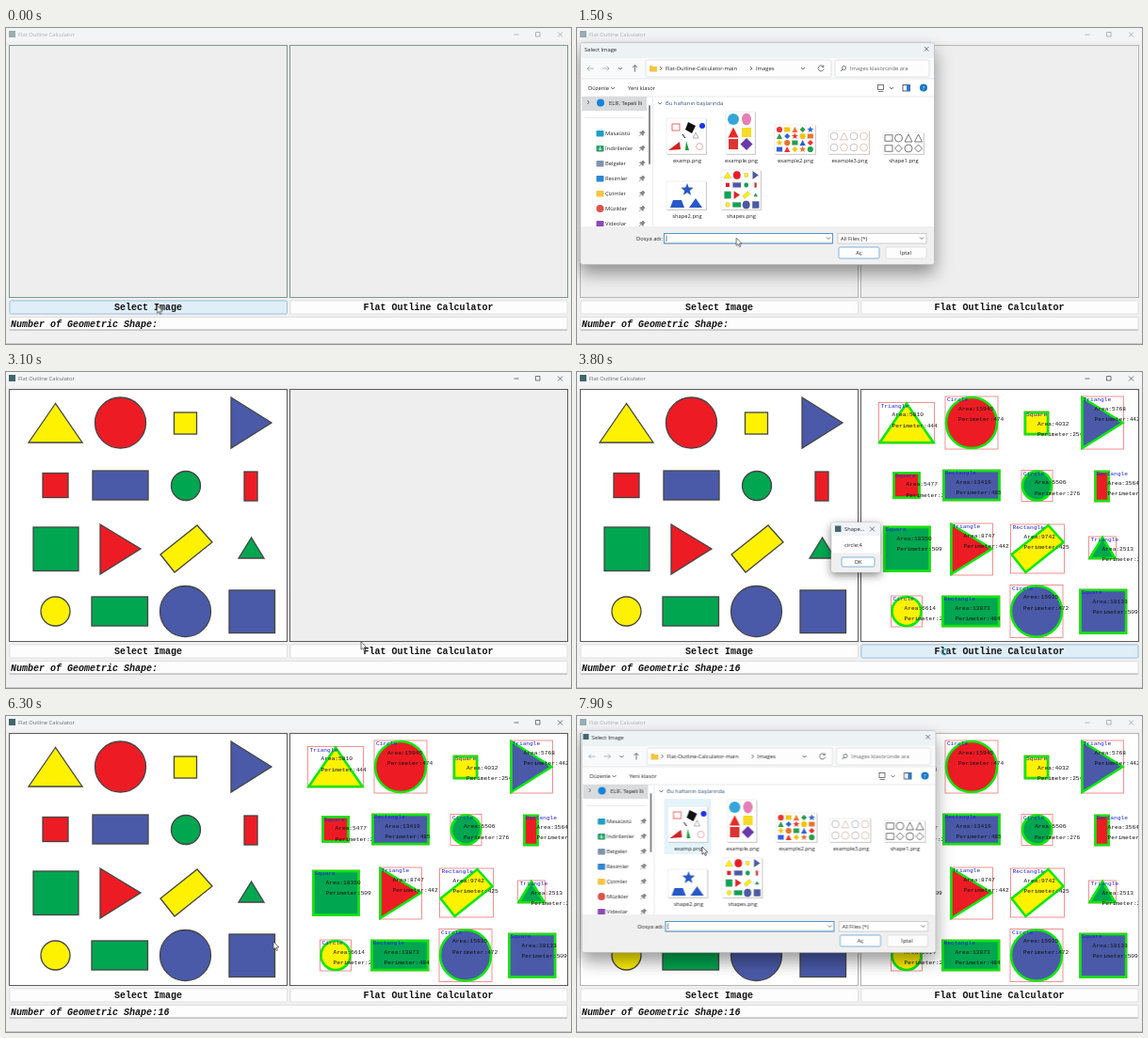
Recreate the animation shown at these times as an HTML page. Size 600 by 336 pixels, loop 8 s.

```html
<!DOCTYPE html>
<html lang="en">
<head>
<meta charset="utf-8">
<title>Shape counter</title>
<style>
html, body { margin: 0; width: 100%; height: 100%; overflow: hidden; background: #f0f0f0; }
svg { display: block; width: 100%; height: 100%; }
text { font: 5.8px "Open Sans", "Noto Sans", sans-serif; fill: #222; white-space: pre; }
.mono { font: bold 10px "Liberation Mono", monospace; fill: #111; }
.it { font-style: italic; }
.note { font: 6.2px "Liberation Mono", monospace; fill: #111; }
.name { fill: #2222d8; }
.mid { text-anchor: middle; }
.dim { fill: #666; }
.line { fill: none; stroke: #555; stroke-width: .8; }
.panel { fill: #eee; animation: border 8s infinite; }
.btn { fill: #fdfdfd; stroke: #d6d6d6; stroke-width: .7; }
.hot { fill: #e0eef7; stroke: #7fb4d8; }
.down { fill: #cce4f7; stroke: #4f97cf; }
.main { stroke: #4f97cf; }
.float { filter: drop-shadow(0 3px 5px #0007); }
.high { filter: drop-shadow(0 9px 9px #0006); }
.step { animation: 8s step-end infinite; }
#caption { animation: caption 8s infinite; }
#hover { animation-name: hover; }
#press { animation-name: press; }
#count { animation-name: count; }
#left, #again { animation-name: left; }
#first { animation-name: first; }
#right, #total { animation-name: right; }
#dialog { animation-name: dialog; }
#picked, #file { animation-name: picked; }
#over { animation-name: over; }
#open { animation-name: open; }
#caret { animation-name: caret; }
#msg0 { animation-name: msg0; }
#msg1 { animation-name: msg1; }
#msg2 { animation-name: msg2; }
#msg3 { animation-name: msg3; }
#ok0 { animation-name: ok0; }
#arrow { animation-name: arrow; }
#busy { animation-name: busy; }
#cursor { animation: travel 8s ease-in-out infinite; }
@keyframes border {
  0% { stroke: #7d9a8c }
  5%, 12.4%, 33.75%, 87.4% { stroke: #5a5a5a }
  12.5%, 33.7%, 87.5%, 100% { stroke: #b4b4b4 }
}
@keyframes caption {
  0%, 12.5%, 33.7%, 87.5%, 100% { opacity: .5 }
  5%, 12.4%, 33.75%, 87.4% { opacity: 1 }
}
@keyframes hover { 0% { opacity: 1 } 7.5% { opacity: 0 } 83% { opacity: 1 } 87.5%, 100% { opacity: 0 } }
@keyframes press { 0% { opacity: 0 } 7.5% { opacity: 1 } 12.5% { opacity: 0 } 85.5% { opacity: 1 } 87.5%, 100% { opacity: 0 } }
@keyframes count { 0% { opacity: 0 } 39% { opacity: 1 } 49.5%, 100% { opacity: 0 } }
@keyframes left { 0% { opacity: 0 } 33.75%, 100% { opacity: 1 } }
@keyframes first { 0% { opacity: 1 } 33.75%, 100% { opacity: 0 } }
@keyframes right { 0% { opacity: 0 } 42.5%, 100% { opacity: 1 } }
@keyframes dialog {
  0% { opacity: 0; transform: none }
  12.5% { opacity: 1; transform: none }
  33.75% { opacity: 0; transform: none }
  87.5%, 100% { opacity: 1; transform: translateX(1.5px) }
}
@keyframes picked { 0% { opacity: 0 } 23.75% { opacity: 1 } 33.75%, 100% { opacity: 0 } }
@keyframes over { 0% { opacity: 0 } 94%, 100% { opacity: 1 } }
@keyframes open { 0% { opacity: 0 } 29% { opacity: 1 } 33.75%, 100% { opacity: 0 } }
@keyframes caret { 0% { opacity: 1 } 23.75% { opacity: 0 } 87.5%, 100% { opacity: 1 } }
@keyframes msg0 { 0% { opacity: 0 } 43.75% { opacity: 1 } 55%, 100% { opacity: 0 } }
@keyframes msg1 { 0% { opacity: 0 } 55% { opacity: 1 } 60%, 100% { opacity: 0 } }
@keyframes msg2 { 0% { opacity: 0 } 60% { opacity: 1 } 66.25%, 100% { opacity: 0 } }
@keyframes msg3 { 0% { opacity: 0 } 66.25% { opacity: 1 } 71.25%, 100% { opacity: 0 } }
@keyframes ok0 { 0% { opacity: 0 } 53%, 100% { opacity: 1 } }
@keyframes arrow { 0% { opacity: 1 } 42.5% { opacity: 0 } 49%, 100% { opacity: 1 } }
@keyframes busy { 0% { opacity: 0 } 42.5% { opacity: 1 } 49%, 100% { opacity: 0 } }
@keyframes travel {
  0%, 14% { transform: translate(160.5px, 295px) }
  22.5%, 24.5% { transform: translate(175px, 176px) }
  30%, 34.5% { transform: translate(282.5px, 234px) }
  40%, 49% { transform: translate(388px, 293px) }
  54%, 72% { transform: translate(303px, 205px) }
  77.5%, 79.5% { transform: translate(284px, 240px) }
  83.75%, 88.5% { transform: translate(160.5px, 295px) }
  95%, 100% { transform: translate(133px, 139px) }
}
</style>
</head>
<body>
<svg viewBox="0 0 600 336">
  <defs>
    <clipPath id="clipR"><rect x="302" y="19" width="294" height="267"/></clipPath>
    <clipPath id="clipSide"><rect x="4" y="73" width="70" height="138"/></clipPath>
  </defs>
  <rect width="600" height="336" fill="#f0f0f0"/>
  <rect width="600" height="14" fill="#f3f4f5"/>
  <path d="M0 335.5H600" stroke="#c9c9c9"/>
  <g id="caption">
    <rect x="3" y="3" width="7" height="7" fill="#41666c"/>
    <text x="13" y="9" class="dim">Flat Outline Calculator</text>
    <path class="line" d="M539.5 7h5M562.5 4.5h4.5v4.5h-4.5zM586 4.5l5 5m0-5l-5 5"/>
  </g>
  <rect class="panel" x="3.5" y="18.5" width="295" height="268"/>
  <rect class="panel" x="301.5" y="18.5" width="295" height="268"/>
  <g id="left" class="step">
    <rect x="4" y="19" width="294" height="267" fill="#fff"/>
    <g id="pic" stroke="#444" stroke-width="1.3"></g>
  </g>
  <g id="right" class="step">
    <g clip-path="url(#clipR)">
      <rect x="302" y="19" width="294" height="267" fill="#fff"/>
      <g id="found" transform="translate(297.5 0)"></g>
    </g>
  </g>
  <rect class="btn" x="4" y="290" width="294.5" height="14" rx="1.5"/>
  <rect id="hover" class="btn hot step" x="4" y="290" width="294.5" height="14" rx="1.5"/>
  <rect id="press" class="btn down step" x="4" y="290" width="294.5" height="14" rx="1.5"/>
  <rect class="btn" x="302" y="290" width="294" height="14" rx="1.5"/>
  <rect id="count" class="btn hot step" x="302" y="290" width="294" height="14" rx="1.5"/>
  <text class="mono" x="115" y="300">Select Image</text>
  <text class="mono" x="379.5" y="300">Flat Outline Calculator</text>
  <rect class="btn" x="3.5" y="307.5" width="592.5" height="13.5" rx="1"/>
  <path d="M4 321H596" stroke="#a0a0a0" stroke-width=".8"/>
  <text class="mono it" x="5" y="318">Number of Geometric Shape:</text>
  <text id="total" class="mono it step" x="161.5" y="318">16</text>
  <g id="dialog" class="step"></g>
  <g id="messages"></g>
  <g id="cursor">
    <path id="arrow" class="step" d="M0 0v8.2l1.9-1.7 1.3 3 1.3-.6-1.3-2.9h2.6z" fill="#fff" stroke="#333" stroke-width=".7"/>
    <circle id="busy" class="step" cx="2" cy="4.5" r="3" fill="none" stroke="#4aa3a8" stroke-width="1.3"/>
  </g>
</svg>
<script>
const $ = id => document.getElementById(id);
const Y = '#fff200', R = '#ed1c24', B = '#4a5aa8', G = '#00a650';

const rect = (x, y, w, h, attrs = '') => `<rect x="${x}" y="${y}" width="${w}" height="${h}" ${attrs}/>`;
const circle = (x, y, r, attrs = '') => `<circle cx="${x}" cy="${y}" r="${r}" ${attrs}/>`;
const poly = (pts, attrs = '') => `<polygon points="${pts}" ${attrs}/>`;
const path = (d, attrs = 'class="line"') => `<path d="${d}" ${attrs}/>`;
const text = (x, y, s, cls = '') => `<text x="${x}" y="${y}" class="${cls}">${s}</text>`;
const fill = c => `fill="${c}"`;
const chevron = (x, y) => path(`M${x - 2} ${y - 1}l2 2 2-2`);
const step = (id, content) => `<g id="${id}" class="step">${content}</g>`;

// geometry, label, area, perimeter
const shapes = [
  [poly('52.5,33.5 24,75 81,75', fill(Y)), 'Triangle', 5810, 444],
  [circle(121.5, 54, 27, fill(R)), 'Circle', 15945, 474],
  [rect(178.5, 43, 24, 23, fill(Y)), 'Square', 4032, 254],
  [poly('239,27 282,54 239,81', fill(B)), 'Triangle', 5768, 442],
  [rect(39, 107.5, 27, 26, fill(R)), 'Square', 5477, 296],
  [rect(92, 105, 59, 31, fill(B)), 'Rectangle', 13419, 485],
  [circle(191, 121, 15.5, fill(G)), 'Circle', 5506, 276],
  [rect(253, 106, 14, 31, fill(R)), 'Rectangle', 3564, 268],
  [rect(29, 165, 48, 46.5, fill(G)), 'Square', 18350, 509],
  [poly('100,162 143,188 100,215', fill(R)), 'Triangle', 8747, 442],
  [poly('164,194 203,163 219,181 179,213', fill(Y)), 'Rectangle', 9742, 425],
  [poly('260.5,176 247,198 274,198', fill(G)), 'Triangle', 2513, 226],
  [circle(52.5, 254.5, 15.5, fill(Y)), 'Circle', 6614, 278],
  [rect(91, 239, 59.5, 31, fill(G)), 'Rectangle', 13873, 484],
  [circle(190.5, 254.5, 27, fill(B)), 'Circle', 15935, 472],
  [rect(237, 232, 48.5, 45.5, fill(B)), 'Square', 18133, 509],
];

$('pic').innerHTML = shapes.map(s => s[0]).join('');
$('found').innerHTML = shapes.map(([shape, name, area, edge], i) => {
  const { x, y, width, height } = $('pic').children[i].getBBox();
  return rect(x - 1, y - 1, width + 2, height + 2, 'fill="none" stroke="#e77" stroke-width=".8"') +
    `<g stroke="#0ce80f" stroke-width="2.6">${shape}</g>` +
    text(x + 1, y + 4, name, 'note name') +
    text(x + 13, y + 13.5, 'Area:' + area, 'note') +
    text(x + 13, y + 25, 'Perimeter:' + edge, 'note');
}).join('');

const star = (x, y, r) => Array.from({ length: 10 }, (_, i) => {
  const a = Math.PI * (i / 5 - .5), q = i % 2 ? r * .42 : r;
  return (x + q * Math.cos(a)).toFixed(1) + ',' + (y + q * Math.sin(a)).toFixed(1);
}).join(' ');
const tri = (x, y, r) => `${x},${y - r} ${x - r},${y + r} ${x + r},${y + r}`;
const gem = (x, y, r) => `${x},${y - r} ${x + r},${y} ${x},${y + r} ${x - r},${y}`;
const glyph = (k, x, y, r, attrs) => [
  () => circle(x, y, r, attrs),
  () => rect(x - r, y - r * .8, r * 2, r * 1.6, attrs),
  () => poly(tri(x, y, r), attrs),
  () => poly(gem(x, y, r), attrs),
  () => poly(star(x, y, r * 1.2), attrs),
][k % 5]();
const grid = (cols, rows, draw) =>
  Array.from({ length: cols * rows }, (_, i) => draw(i % cols, i / cols | 0, i)).join('');
const sheet = (x, y, w, h) => rect(x + .8, y + .8, w, h, 'fill="#bbb"') +
  rect(x, y, w, h, 'fill="#fff" stroke="#ddd" stroke-width=".5"');
const outline = c => `fill="none" stroke="${c}" stroke-width=".8"`;

function thumbs() {
  const hues = ['#e33', '#2a9d4a', '#f4c20d', '#2b62d9', '#e8742c'];
  return sheet(95, 96, 42, 38) +
    rect(101, 102, 8, 7, outline('#e44')) + poly('118,100 126,104 122,112 115,108', fill('#111')) +
    circle(133, 104, 3, fill('#1b35e8')) + poly(tri(126, 114, 3), outline('#99a')) +
    path('M112 113l3 4', 'stroke="#111"') +
    poly('97,130 109,121 110,129', fill('#c22')) + poly('116,120 119,130 115,130', fill('#1a9a3c')) +
    circle(130, 126, 3.5, outline('#d99')) +
    sheet(158, 89, 31, 45) +
    circle(166, 97, 6, fill('#35a5dc')) + `<ellipse cx="180" cy="97" rx="5" ry="6.5" fill="#e67fb5"/>` +
    poly(tri(166, 111, 5.5), fill('#e52b24')) + rect(175, 106, 10, 10, fill('#f6dc25')) +
    rect(161, 118, 10, 11, fill('#d33')) + poly(gem(180, 123.5, 6.5), fill('#6a39a8')) +
    sheet(210, 103, 43, 31) +
    grid(5, 4, (c, r, i) => glyph(c + r * 2, 215 + c * 8.2, 108 + r * 7, 3.1, fill(hues[(i * 2 + r) % 5]))) +
    sheet(267, 109, 43, 25) +
    grid(4, 2, (c, r, i) => glyph(i === 1 ? 2 : 0, 273 + c * 10.5, 115 + r * 12, 3.9, outline(c % 2 ? '#d9b9a5' : '#b5b5b5'))) +
    sheet(325, 111, 43, 23) +
    grid(4, 2, (c, r, i) => glyph([1, 0, 2, 2, 1, 3, 0, 3][i], 331 + c * 10.5, 117 + r * 11, 4, outline('#555'))) +
    sheet(95, 163, 42, 30) +
    poly(star(117, 172, 7), fill('#2858c8')) + poly('99,191 102,183 111,183 114,191', fill('#2858c8')) +
    poly('126,181 119,191 133,191', fill('#2858c8')) +
    sheet(153, 151, 42, 42) +
    '<use href="#pic" transform="translate(153 151) scale(.143 .157) translate(-4 -19)"/>';
}

function sidebar() {
  const items = [['Masaüstü', '#1f9ec4'], ['İndirilenler', '#2a9d6b'], ['Belgeler', '#7d93a8'],
    ['Resimler', '#2f86d6'], ['Çizimler', '#f5c445'], ['Müzikler', '#e0524a'], ['Videolar', '#8a49b8']];
  return `<g clip-path="url(#clipSide)">` + rect(5, 73, 69, 15, fill('#d9dbdc')) +
    path('M11 77l2 2-2 2') + circle(25, 79.5, 4, fill('#1683d8')) +
    text(34, 82, 'ELİF, Tepeli İli') + path('M8 95.5H72', 'stroke="#e3e3e3" stroke-width=".7"') +
    items.map(([s, c], i) => {
      const y = 112 + i * 16;
      return (i === 5 ? circle(24.5, y, 4, fill(c)) : rect(20.5, y - 3, 8, 6.5, `rx="1" ${fill(c)}`)) +
        (i === 1 ? path(`M24.5 ${y - 2}v4m-1.7-1.7l1.7 1.7 1.7-1.7`, 'fill="none" stroke="#fff" stroke-width=".8"') : '') +
        text(30, y + 2, s) +
        path(`M66 ${y + 3}l2-2m-1.5-2l3.5 3.5 .5-2 1.5-1.5-2-2-1.5 1.5z`, 'fill="#888" stroke="#777" stroke-width=".6"');
    }).join('') + '</g>' + rect(76, 82, 2, 63, 'rx="1" fill="#8b8b8b"');
}

function dialog() {
  const rule = y => path(`M3.5 ${y}H379`, 'stroke="#e4e4e4" stroke-width=".8"');
  const files = ['examp.png', 'example.png', 'example2.png', 'example3.png', 'shape1.png', 'shape2.png', 'shapes.png'];
  return `<g class="high">` + rect(3.5, 15.5, 376, 236, 'rx="3" fill="#fff" stroke="#b5b5b5" stroke-width=".7"') + '</g>' +
    rect(4, 16, 375, 16, 'rx="2.5" fill="#edf3f5"') +
    step('first', text(8, 24.5, 'Select Image')) +
    step('again', rect(5, 19, 6, 6, fill('#41666c')) + text(14, 24.5, 'Select Image')) +
    path('M369 20l4.5 4.5m0-4.5l-4.5 4.5') +
    rect(4, 32, 375, 22, fill('#f9fafb')) + rule(54) + rule(73) +
    path('M18 43h-7m2.5-2.5L11 43l2.5 2.5M27 43h7m-2.5-2.5L34 43l-2.5 2.5', 'class="line" opacity=".5"') +
    chevron(46, 43) + path('M61.5 46.5v-7m-2.5 2.5l2.5-2.5 2.5 2.5') +
    rect(73, 34, 197, 18, 'class="btn" rx="1.5"') +
    path('M77 40h3l1 1h4v5.5h-8z', fill('#f5c445')) + path('M88 41l2 2-2 2M184 41l2 2-2 2') +
    text(94, 45, 'Flat-Outline-Calculator-main') + text(190, 45, 'Images') + chevron(240, 43) +
    path('M261.5 41a3 3 0 1 0 .6 2.5m-.3-4v2h-2') +
    rect(274, 34, 100, 18, 'class="btn" rx="1.5"') +
    circle(283.5, 42.5, 2, 'class="line"') + path('M282 44l-2 2') + text(290, 45, 'Images klasöründe ara', 'dim') +
    text(12, 66, 'Düzenle') + chevron(38, 64) + text(54, 66, 'Yeni klasör') +
    rect(319.5, 60.5, 6, 5, 'class="line"') + path('M320 67.5h5.5') + chevron(334, 64) +
    rect(346, 60.5, 7.5, 6.5, outline('#335')) + rect(350, 60.5, 3.5, 6.5, fill('#2b7bd0')) +
    circle(368, 63.5, 4, fill('#1677c8')) + `<text x="368" y="65.6" class="mid" style="fill:#fff">?</text>` +
    path('M80.5 74V211', 'stroke="#e8e8e8" stroke-width=".8"') + sidebar() +
    chevron(88, 80) + `<text x="94" y="82" style="fill:#31527f">Bu haftanın başlarında</text>` +
    rect(91, 88, 50, 59, 'id="over" class="step" fill="#e5f3fb"') +
    step('picked', rect(148, 146.5, 52, 58, 'fill="#d9d9d9" stroke="#c4c4c4" stroke-width=".6"')) +
    thumbs() +
    files.map((s, i) => text(117 + i % 5 * 57.5, i < 5 ? 142.5 : 201.5, s, 'mid')).join('') +
    rect(4, 211, 375, 40, 'rx="2" fill="#f0f0f0"') +
    text(63, 226, 'Dosya adı:') + rect(92.5, 218.5, 179, 10.5, 'fill="#fff" stroke="#999" stroke-width=".7"') +
    chevron(267, 223.5) +
    step('caret', rect(92.5, 218.5, 179, 10.5, outline('#3c8fd0')) + path('M95 220.5v6.5')) +
    step('file', text(94, 226, 'shapes.png')) +
    rect(277, 218.5, 94, 10.5, 'fill="#fff" stroke="#bbb" stroke-width=".7"') + text(280, 226, 'All Files (*)') + chevron(366, 223.5) +
    rect(278, 233, 43, 12, 'class="btn main" rx="1.5"') +
    rect(278, 233, 43, 12, 'id="open" class="btn down step" rx="1.5"') + text(299.5, 241, 'Aç', 'mid') +
    rect(328, 233, 43, 12, 'class="btn" rx="1.5"') + text(349, 241, 'İptal', 'mid');
}

function message(label, i) {
  const w = i ? 56 : 52.5, mid = i ? 300 : 298.5, x = i ? 315.5 : 313.5;
  const ok = attrs => rect(mid - 17.5, 197, 35, 10, attrs + ' rx="1.5"');
  return step('msg' + i, `<g class="float">` +
    rect(270, 160, w, 53, 'rx="2.5" fill="#fff" stroke="#b8b8b8" stroke-width=".6"') + '</g>' +
    rect(270.3, 160.3, w - .6, 14, 'rx="2" fill="#f0f4f8"') +
    rect(274, 163.5, 6.5, 6.5, fill('#41666c')) + text(284, 169, 'Shape...') +
    path(`M${x - 2.3} 164.7l4.6 4.6m0-4.6l-4.6 4.6`) +
    rect(270.3, 192.5, w - .6, 20, 'rx="2" fill="#f0f0f0"') + text(284, 185.5, label) +
    ok('class="btn main"') +
    ok(i ? 'class="btn down"' : 'id="ok0" class="btn down step"') +
    text(mid, 204.3, 'OK', 'mid'));
}

$('dialog').innerHTML = dialog();
$('messages').innerHTML = ['circle:4', 'triangle: 4', 'rectangle: 4', 'square: 4'].map(message).join('');
</script>
</body>
</html>
```
